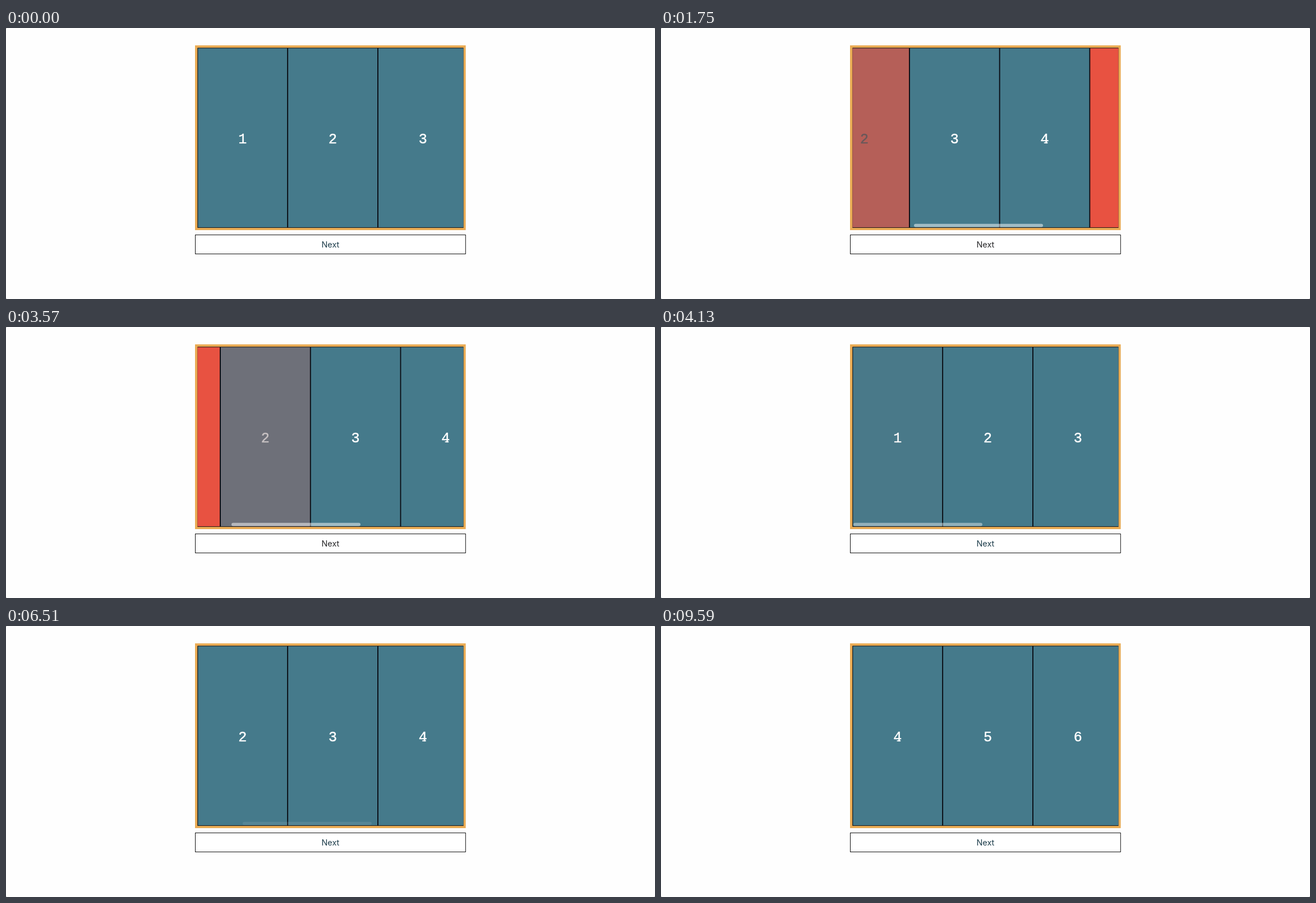
Animation of 1157 by 484 pixels, one loop 9660 ms. Source, as an HTML page:

```html
<!DOCTYPE html>
<html lang="en">
<head>
<meta charset="utf-8">
<title>Panel scroller</title>
<style>
  html, body { margin: 0; width: 100%; height: 100%; overflow: hidden; background: #fefefe; }
  svg { display: block; width: 100%; height: 100%; }
  .panel rect { stroke: #08080f; stroke-width: .9; }
  .panel text { font: 25px "Liberation Mono", monospace; text-anchor: middle; stroke-width: .5; }
  .next { font: 14.4px Inter, sans-serif; text-anchor: middle; }
</style>
</head>
<body>
<svg viewBox="0 0 1157 484">
  <rect width="1157" height="484" fill="#fefefe"/>
  <path d="M0 0h1v1h-1zM1156 0h1v1h-1zM0 483h1v1h-1zM1156 483h1v1h-1z" fill="#aaa"/>
  <clipPath id="view"><rect x="341.4" y="35.4" width="474.1" height="321.4"/></clipPath>
  <rect x="337" y="31" width="482.6" height="330" fill="#eaac55"/>
  <g clip-path="url(#view)">
    <rect x="341" y="35" width="475" height="322" fill="#08080f"/>
    <g id="strip"></g>
    <rect id="bar" y="349.7" width="230" height="5.8" rx="2.9" fill="#fff"/>
  </g>
  <rect x="337.5" y="369.5" width="481.8" height="34" fill="#fff" stroke="#111"/>
  <text id="label" class="next" x="578.4" y="392">Next</text>
</svg>
<script>
const LOOP = 9660, LEFT = 341.4, VIEW = 474, PITCH = 160.75, COUNT = 6;
const THRESHOLD = .67, DELAY = 60, FADE = 400;
const RED = [232, 82, 65], TEAL = [69, 122, 139];
const DARK = [36, 12, 14], WHITE = [255, 255, 255];

// Scrolling by hand: time, offset
const drag = [[700, 0], [1100, 120], [1530, 213.8], [1750, 220], [1820, 221],
  [2430, 437.5], [2600, 490.5], [2850, 490.5], [3325, 213.8], [3570, 120.5], [3990, 0]];
// Button presses: time, offset
const jumps = [[5670, PITCH], [6650, 2 * PITCH], [7280, 3 * PITCH]];
// Scrollbar: shown at, starts to fade at
const barTimes = [[700, 4080], [5705, 6265], [6685, 7875]];
const BAR_FADE = 300;

const clamp = v => Math.max(0, Math.min(1, v));
const mix = (a, b, k) => `rgb(${a.map((v, i) => Math.round(v + (b[i] - v) * k))})`;

const slope = i => (drag[i + 1][1] - drag[i][1]) / (drag[i + 1][0] - drag[i][0]);
function tangent(i) {
  if (i === 0 || i === drag.length - 1) return 0;
  const a = slope(i - 1), b = slope(i);
  return a * b > 0 ? 2 * a * b / (a + b) : 0;
}

function offsetAt(t) {
  const jump = jumps.filter(j => t >= j[0]).pop();
  if (jump) return jump[1];
  const i = drag.findIndex((p, n) => n < drag.length - 1 && t >= p[0] && t < drag[n + 1][0]);
  if (i < 0) return 0;
  const [t0, s0] = drag[i], [t1, s1] = drag[i + 1];
  const h = t1 - t0, u = (t - t0) / h, v = 1 - u;
  return s0 * (1 + 2 * u) * v * v + s1 * u * u * (3 - 2 * u)
    + h * u * v * (v * tangent(i) - u * tangent(i + 1));
}

// CSS "ease": cubic-bezier(.25, .1, .25, 1)
function ease(x) {
  if (x <= 0 || x >= 1) return clamp(x);
  let lo = 0, hi = 1, u;
  for (let n = 0; n < 20; n++) {
    u = (lo + hi) / 2;
    const bx = .75 * u * (1 - u) + u ** 3;
    if (bx < x) lo = u; else hi = u;
  }
  return .3 * u * (1 - u) ** 2 + 3 * u * u * (1 - u) + u ** 3;
}

function visible(i, offset) {
  const x = i * PITCH - offset;
  return Math.max(0, Math.min(VIEW, x + PITCH) - Math.max(0, x)) / PITCH;
}

// Moments at which each panel enters or leaves the view
const toggles = Array.from({ length: COUNT }, (_, i) => {
  const list = [];
  let on = visible(i, 0) >= THRESHOLD;
  list.push([-LOOP, on]);
  for (let t = 0; t < LOOP; t += 5) {
    const now = visible(i, offsetAt(t)) >= THRESHOLD;
    if (now !== on) list.push([t + DELAY, on = now]);
  }
  return list;
});

function activity(i, t) {
  const [start, on] = toggles[i].filter(e => t >= e[0]).pop();
  const k = ease((t - start) / FADE);
  return on ? k : 1 - k;
}

function barAlpha(t) {
  const span = barTimes.find(([on, off]) => t >= on && t < off + BAR_FADE);
  return span ? clamp(1 - (t - span[1]) / BAR_FADE) : 0;
}

const strip = document.getElementById("strip");
const bar = document.getElementById("bar");
const label = document.getElementById("label");

function make(tag, attrs, parent) {
  const el = document.createElementNS("http://www.w3.org/2000/svg", tag);
  for (const k in attrs) el.setAttribute(k, attrs[k]);
  return parent.appendChild(el);
}

const panels = Array.from({ length: COUNT }, (_, i) => {
  const g = make("g", { class: "panel" }, strip);
  const box = make("rect", { x: .45, y: 35.8, width: PITCH - .9, height: 320.6 }, g);
  const ink = make("g", {}, g);
  make("text", { x: PITCH / 2, y: 206 }, ink).textContent = i + 1;
  if (i === 3) make("path", { d: "M79.2 204.2h6.6v1.8h-6.6z", "stroke-width": 0 }, ink);
  return { g, box, ink };
});

function draw(t) {
  const offset = offsetAt(t);
  let allOn = true;
  panels.forEach(({ g, box, ink }, i) => {
    const k = activity(i, t), color = mix(DARK, WHITE, k);
    g.setAttribute("transform", `translate(${LEFT + i * PITCH - offset} 0)`);
    box.setAttribute("fill", mix(RED, TEAL, k));
    ink.setAttribute("fill", color);
    ink.setAttribute("stroke", color);
    if (k < .97 && visible(i, offset) > 0) allOn = false;
  });
  bar.setAttribute("x", 342.9 + offset * .4915);
  bar.setAttribute("opacity", .5 * barAlpha(t));
  label.setAttribute("fill", allOn ? "#1c3c4a" : "#262628");
}

const begin = performance.now();
function tick() {
  draw((performance.now() - begin) % LOOP);
  requestAnimationFrame(tick);
}
tick();
</script>
</body>
</html>
```
